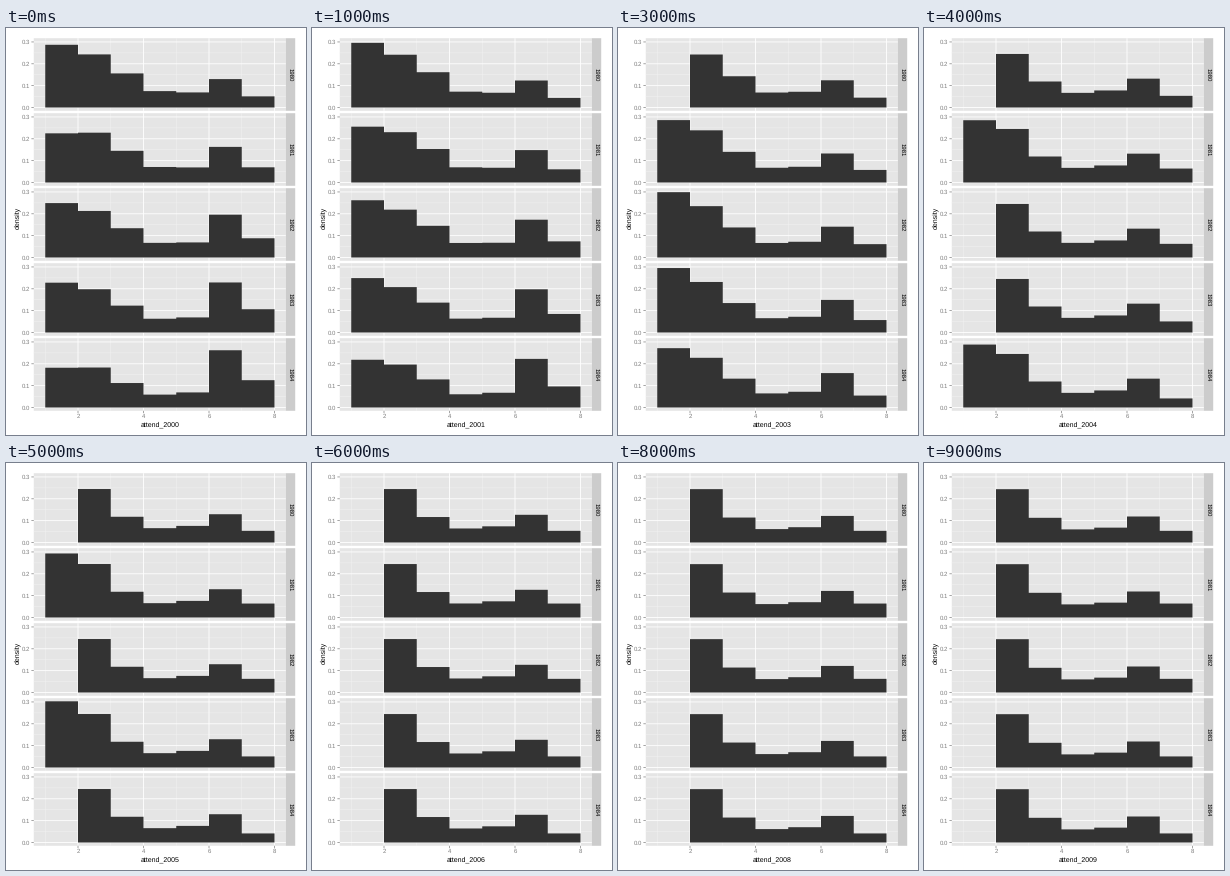
Recreate the animation shown at these times as a matplotlib script. Size 300x407 px, loop 10000 ms.

```python
import math

import matplotlib.pyplot as plt
import numpy as np
from matplotlib.animation import FuncAnimation
from matplotlib.patches import Polygon, Rectangle

W, H, DPI = 300, 407, 64
PX = 72 / DPI
plt.rcParams["font.family"] = ["Liberation Sans", "DejaVu Sans"]
plt.rcParams["text.hinting"] = "none"
plt.rcParams["text.hinting_factor"] = 1

LEFT, RIGHT, STRIP = 27.8, 279.8, 289.2
TOP, HEIGHT, STEP = 10.2, 72.6, 75.0
ZERO, X_UNIT, Y_UNIT = 79.5, 32.75, 218.5
GREY, BAR = "#7f7f7f", "#333333"

# Answer 1: key points (years since 2000, share) of each birth cohort.
# Shares beyond the axis limit are not drawn.
LIMIT = 0.3045
FIRST = [
    [(0, 0.287), (1, 0.296), (2, 0.321)],
    [(0, 0.225), (2, 0.286), (4, 0.285), (5, 0.293), (6, 0.307)],
    [(0, 0.249), (2, 0.275), (3, 0.299), (4, 0.323)],
    [(0, 0.228), (2, 0.270), (4, 0.320), (5, 0.303), (6, 0.346)],
    [(0, 0.182), (2, 0.255), (4, 0.288), (5, 0.323)],
]

# Answers 2 to 7: mean share at the key years, and the step from one
# cohort to the next at the start, which fades out over FADE years.
KEYS, FADE = [0, 2, 4, 9], 4
TRENDS = [
    ([0.213, 0.225, 0.245, 0.244], -0.015),
    ([0.134, 0.156, 0.119, 0.113], -0.011),
    ([0.067, 0.066, 0.067, 0.060], -0.004),
    ([0.069, 0.066, 0.078, 0.068], 0.0),
    ([0.196, 0.150, 0.132, 0.119], 0.033),
    ([0.088, 0.055, 0.053, 0.053], 0.0185),
]


def x_pos(value):
    return 72.0 + (value - 2) * X_UNIT


def densities(cohort, t):
    first = np.interp(t, *zip(*FIRST[cohort]))
    fade = max(0, 1 - t / FADE)
    rest = [np.interp(t, KEYS, means) + step * (cohort - 2) * fade
            for means, step in TRENDS]
    # The last answer settles at a level that varies between cohorts.
    rest[-1] += 0.012 * math.cos(1.1 * (cohort - 1.4)) * (1 - fade)
    return [first if first <= LIMIT else 0] + rest


def outline(heights, zero):
    start = 1 if heights[0] else 2
    points = [(x_pos(start), zero)]
    for i, h in enumerate(heights[start - 1:], start):
        y = zero - h * Y_UNIT
        points += [(x_pos(i), y), (x_pos(i + 1), y)]
    return points + [(x_pos(8), zero)]


fig = plt.figure(figsize=(W / DPI, H / DPI), dpi=DPI, facecolor="white")
ax = fig.add_axes([0, 0, 1, 1])
ax.set_xlim(0, W)
ax.set_ylim(H, 0)
ax.axis("off")


def line(xs, ys, color, width, z):
    ax.plot(xs, ys, color=color, lw=width * PX, zorder=z,
            solid_capstyle="butt", snap=False)


def label(x, y, text, size, color, **kw):
    kw = {"ha": "center", "va": "baseline", **kw}
    return ax.text(x, y, text, fontsize=size * PX, color=color, zorder=6, **kw)


def box(x0, x1, y, color):
    ax.add_patch(Rectangle((x0, y), x1 - x0, HEIGHT, fc=color, lw=0,
                           zorder=1, snap=False))


bars = []
for row in range(5):
    top, zero = TOP + row * STEP, ZERO + row * STEP
    bottom = top + HEIGHT
    box(LEFT, RIGHT, top, "#e5e5e5")
    box(RIGHT, STRIP, top, "#cccccc")
    for x in (1, 3, 5, 7):
        line([x_pos(x)] * 2, [top, bottom], "#f2f2f2", 0.5, 2)
    for k in range(3):
        y = zero - (k + 0.5) * 0.1 * Y_UNIT
        line([LEFT, RIGHT], [y, y], "#f2f2f2", 0.5, 2)
    for x in (2, 4, 6, 8):
        line([x_pos(x)] * 2, [top, bottom], "white", 0.85, 3)
    for k in range(4):
        y = zero - k * 0.1 * Y_UNIT
        line([LEFT, RIGHT], [y, y], "white", 0.85, 3)
        line([LEFT - 2.4, LEFT], [y, y], GREY, 0.7, 3)
        label(24.2, y + 2, f"{k / 10:.1f}", 5.8, GREY, ha="right")
    label(283.7, (top + bottom) / 2 + 0.3, str(1980 + row), 5.9, "black",
          rotation=-90, va="center")
    patch = Polygon([(0, 0)] * 3, closed=True, fc=BAR, lw=0, zorder=4,
                    snap=False)
    bars.append(ax.add_patch(patch))

for x in (2, 4, 6, 8):
    line([x_pos(x)] * 2, [bottom, bottom + 2.4], GREY, 0.7, 3)
    label(x_pos(x), 390, str(x), 5.8, GREY)
label(11, 190, "density", 6.7, "black", rotation=90, va="center")
title = label(153.8, 399, "", 6.7, "black")


def draw(i):
    for row, patch in enumerate(bars):
        patch.set_xy(outline(densities(row, i), ZERO + row * STEP))
    title.set_text(f"attend_{2000 + i}")
    return [*bars, title]


anim = FuncAnimation(fig, draw, frames=10, interval=1000, repeat=True,
                     repeat_delay=0, blit=False)
plt.show()
```
